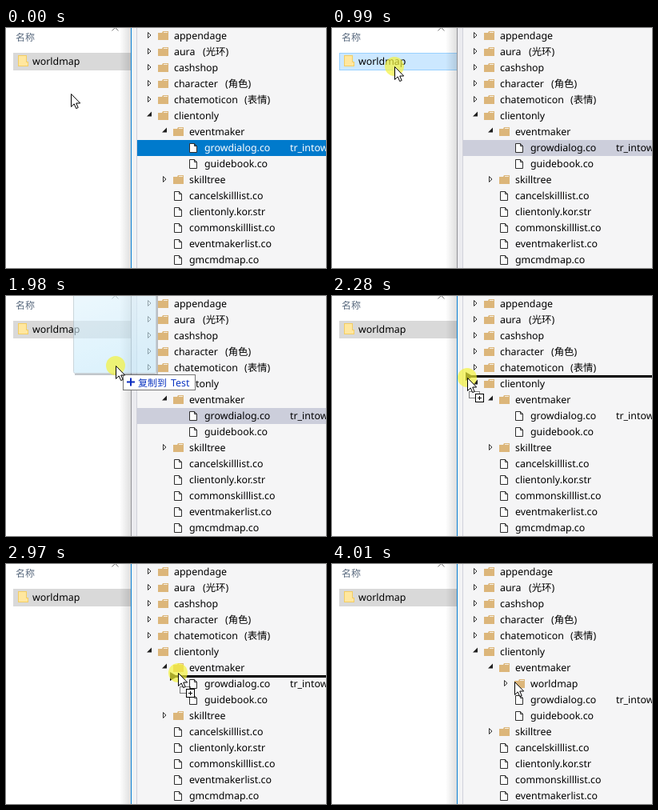
Recreate the animation shown at these times as an HTML page. Size 400x300 px, loop 4720 ms.

```html
<!DOCTYPE html>
<html lang="zh-CN">
<head>
<meta charset="utf-8">
<style>
html, body { margin: 0; width: 100%; height: 100%; overflow: hidden; background: #fff; }
svg { display: block; width: 400px; height: 300px; }
text { font: 12.4px "Noto Sans", "Noto Sans CJK SC", "Noto Sans CJK", sans-serif; fill: #000; text-rendering: geometricPrecision; white-space: pre; }
.cjk { font-size: 12px; font-family: "Noto Sans CJK SC", "Noto Sans CJK", sans-serif; }
.hint { fill: #0a34c0; }
.band { fill: none; }
.active .band { fill: #007acc; }
.active text { fill: #fff; }
.dimmed .band { fill: #cccedb; }
.closed { fill: #fff; stroke: #333; }
.open { fill: #1e1e1e; }
</style>
</head>
<body>
<svg viewBox="0 0 400 300">
  <defs>
    <linearGradient id="glass" x1="0" y1="0" x2="0.3" y2="1">
      <stop offset="0" stop-color="#e2f4fd"/>
      <stop offset="1" stop-color="#c6eafb"/>
    </linearGradient>
    <linearGradient id="shade">
      <stop offset="0" stop-color="#000" stop-opacity="0"/>
      <stop offset="1" stop-color="#000" stop-opacity=".13"/>
    </linearGradient>
    <g id="folder">
      <path d="M0 -4h5l1-2h7v11h-13z" fill="#dcb67a"/>
      <path d="M7 -4.500h5" stroke="#f5f0e4"/>
    </g>
    <path id="file" d="M1.500 -5.500h6l3 3v8h-9zM7.500 -5.500v3h3" fill="#fbfbfb" stroke="#2e2e2e"/>
    <path id="plus" d="M-5 0h10M0 -5v10" stroke="#0a2cc0" stroke-width="2"/>
  </defs>

  <rect width="400" height="300" fill="#fff"/>
  <path d="M132.500 3.500l4-4 4 4" fill="none" stroke="#777"/>
  <text class="cjk" x="12" y="16" style="fill:#56677c">名称</text>
  <rect id="item" x="9.500" y="31.500" width="150" height="21"/>
  <path d="M15 34h11v8h2v6h-13z" fill="#f3cd63"/>
  <path d="M16 35h9v8h2v4h-11z" fill="#ffe79f"/>
  <text x="33" y="46">worldmap</text>

  <rect x="142" width="14" height="300" fill="url(#shade)"/>
  <rect x="156" width="244" height="300" fill="#f5f5f6"/>
  <rect id="margin" x="157" width="6" height="300"/>
  <rect x="163" width="1" height="300" fill="#d0d1da"/>
  <rect id="edge" x="156" width="1" height="300"/>
  <g id="tree"></g>
  <path id="insert" d="M0 -5l7 4h400v3h-400l-7 4z" fill="#000"/>

  <g id="ghost">
    <path d="M52 -93v104h-103" fill="none" stroke="#345" stroke-width="2" opacity=".3"/>
    <rect x="-52.500" y="-93.500" width="103" height="103" rx="2" fill="url(#glass)" stroke="#a9bcc6" opacity=".6"/>
  </g>
  <circle id="halo" r="12" fill="#f4f23c"/>
  <g id="pointer">
    <g id="treeDrag">
      <rect x="2.500" y="17.500" width="13" height="8" fill="none" stroke="#000" stroke-dasharray="1 1"/>
      <rect x="10.500" y="20.500" width="10" height="10" fill="#fff" stroke="#000"/>
      <path d="M13 25.500h5M15.500 23v5" stroke="#000"/>
    </g>
    <g id="hint">
      <rect x="9.500" y="11.500" width="90" height="19" fill="#fff" stroke="#767676"/>
      <text class="cjk hint" x="28" y="25.500">复制到</text>
      <text class="hint" x="69" y="25.500">Test</text>
    </g>
    <use id="copyMark" href="#plus" x="19" y="20.500"/>
    <path d="M.5 .5v16l3.700-3.600 2.500 5.700 2.500-1.100-2.500-5.500h5z" fill="#fff" stroke="#000"/>
  </g>
</svg>

<script>
const LOOP = 4720, ROW = 20;
const ADDED = 7, SELECTED = 8;
const CLICK = 890, DRAG = 1370, LABEL = 1660, RELEASE = 3850, DROP = 3950;
const $ = id => document.getElementById(id);

// label, depth, kind, optional note and its x
const rows = [
  ["appendage", 0, "closed"],
  ["aura", 0, "closed", "(光环)", 246],
  ["cashshop", 0, "closed"],
  ["character", 0, "closed", "(角色)", 274],
  ["chatemoticon", 0, "closed", "(表情)", 298],
  ["clientonly", 0, "open"],
  ["eventmaker", 1, "open"],
  ["worldmap", 2, "closed"],
  ["growdialog.co", 2, "file", "tr_intoworldmap", 355],
  ["guidebook.co", 2, "file"],
  ["skilltree", 1, "closed"],
  ["cancelskilllist.co", 1, "file"],
  ["clientonly.kor.str", 1, "file"],
  ["commonskilllist.co", 1, "file"],
  ["eventmakerlist.co", 1, "file"],
  ["gmcmdmap.co", 1, "file"]
];
const arrows = {
  closed: "M177.5 -4.500l3.500 3.500-3.500 3.500z",
  open: "M182 -5.500v6h-6z"
};

const tree = $("tree");
tree.innerHTML = rows.map(([label, depth, kind, note, noteX]) => {
  const dx = depth * 19;
  const arrow = arrows[kind] ? `<path class="${kind}" d="${arrows[kind]}" transform="translate(${dx})"/>` : "";
  const icon = kind === "file" ? "file" : "folder";
  const extra = note ? `<text x="${noteX}" y="4">${note}</text>` : "";
  return `<g><rect class="band" x="164" y="-10" width="236" height="20"/>${arrow}
    <use href="#${icon}" x="${190 + dx}"/><text x="${210 + dx}" y="4">${label}</text>${extra}</g>`;
}).join("");
const rowNodes = [...tree.children];

// time, x, y of the pointer
const path = [
  [40, 81, 82], [560, 78, 48], [1360, 78, 48], [1590, 104, 66],
  [1880, 132, 85], [1980, 137, 87], [2480, 190, 112], [2580, 190, 112],
  [2710, 196, 123], [3120, 226, 144], [3190, 228, 147]
];

function pointerAt(t) {
  if (t <= path[0][0]) return path[0].slice(1);
  const next = path.findIndex(p => p[0] > t);
  if (next < 0) return path[path.length - 1].slice(1);
  const a = path[next - 1], b = path[next];
  let k = (t - a[0]) / (b[0] - a[0]);
  if (next === 1) k = k * k * (3 - 2 * k);
  return [a[1] + (b[1] - a[1]) * k, a[2] + (b[2] - a[2]) * k].map(Math.round);
}

const show = (id, on) => { $(id).style.display = on ? "" : "none"; };
const clamp = v => Math.max(0, Math.min(1, v));
const rowAt = slot => slot < ADDED ? slot : slot + 1;

function draw(t) {
  const [x, y] = pointerAt(t);
  const overTree = t >= DRAG && x >= 157;
  const dragging = t >= DRAG && t < RELEASE + 60;
  const fileDrag = dragging && !overTree;
  const treeDrag = dragging && overTree;
  const treeActive = t < CLICK || overTree;
  const dropped = t >= DROP;

  const hot = t < DRAG && y < 53;
  $("item").setAttribute("fill", hot ? "#cce8ff" : "#d9d9d9");
  $("item").setAttribute("stroke", hot ? "#99d1ff" : "#d9d9d9");
  $("edge").setAttribute("fill", treeActive ? "#0a80d4" : "#929297");
  $("margin").setAttribute("fill", treeActive ? "#f3f3f5" : "#ebebef");

  // Near a row boundary the drop goes between rows, otherwise onto one.
  const boundary = Math.round(y / ROW);
  const between = treeDrag && Math.abs(y - boundary * ROW) < 5;
  let marked = overTree ? -1 : SELECTED;
  if (treeDrag && !between) marked = rowAt(Math.floor(y / ROW));

  rowNodes.forEach((node, i) => {
    const slot = i > ADDED && !dropped ? i - 1 : i;
    node.setAttribute("transform", `translate(0 ${10 + slot * ROW})`);
    node.setAttribute("class", i !== marked ? "" : treeActive ? "active" : "dimmed");
  });
  rowNodes[ADDED].style.display = dropped ? "" : "none";

  show("insert", between);
  if (between) {
    const depth = rows[rowAt(boundary)][1];
    $("insert").setAttribute("transform", `translate(${167 + depth * 19} ${boundary * ROW})`);
  }

  const place = `translate(${x} ${y})`;
  for (const id of ["ghost", "halo", "pointer"]) $(id).setAttribute("transform", place);
  $("halo").setAttribute("opacity", 0.7 * clamp((t - 860) / 130) * clamp((3960 - t) / 110));
  show("ghost", fileDrag);
  show("copyMark", fileDrag);
  show("hint", fileDrag && t >= LABEL);
  show("treeDrag", treeDrag);
}

const start = performance.now();
function tick() {
  draw((performance.now() - start) % LOOP);
  requestAnimationFrame(tick);
}
tick();
</script>
</body>
</html>
```
